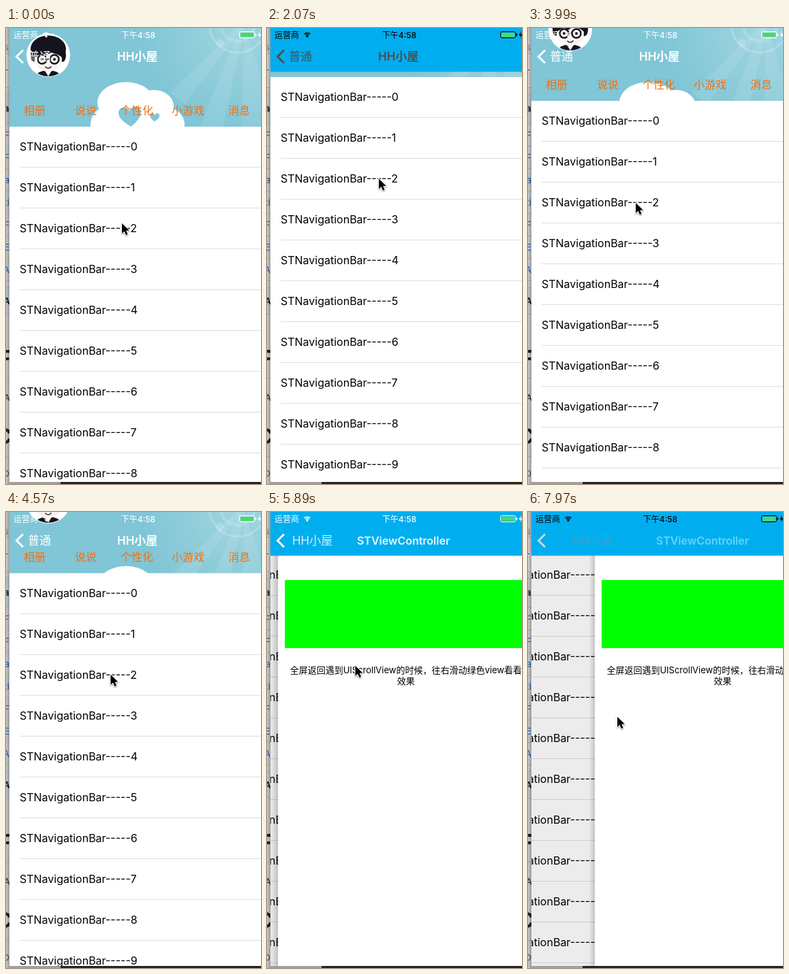
These frames come from a looping animation (374 by 670 pixels, 8000 ms). An HTML page with a canvas:

```html
<!DOCTYPE html>
<html lang="zh-CN">
<head>
<meta charset="utf-8">
<title>Navigation bar demo</title>
<style>
  html, body { margin: 0; width: 100%; height: 100%; overflow: hidden; background: #fff; }
  canvas { display: block; width: 374px; height: 670px; }
</style>
</head>
<body>
<canvas id="stage"></canvas>
<script>
const W = 374, H = 670, LOOP = 8000, TICK = 147.3;
const LEFT = 5, VIEW = 375, BOTTOM = 667, BAR = 64, MID = 192.5;
const FONT = 'Inter, "Noto Sans CJK SC", "Noto Sans CJK", sans-serif';
const BLUE = '#00aef0', SKY = '#80c6d6', INK = '#4c4f52';
const SPACE = 'HH小屋';

const canvas = document.getElementById('stage');
const dpr = window.devicePixelRatio || 1;
canvas.width = W * dpr;
canvas.height = H * dpr;
const c = canvas.getContext('2d');

// Keyframes are [tick, value]; the screen refreshes once per tick.
const SCROLL = [[0, 0], [8, 86], [20, 60], [23, 45], [24, 45], [27, 38], [28, 38], [35, 78], [36, 82]];
const PUSH = [[37, 0], [38, 0.3], [39, 0.85], [40, 0.97], [41, 1]];
const POINT_X = [[0, 170], [8, 165], [20, 163], [27, 158], [35, 149], [39, 149], [45, 32], [47, 20], [48, 20], [54, 131]];
const POINT_Y = [[0, 287], [8, 210], [20, 233], [23, 250], [24, 250], [27, 257], [28, 257], [35, 215], [36, 212],
  [39, 212], [45, 296], [48, 297], [54, 301]];

const mix = (a, b, k) => a + (b - a) * k;
const clamp = v => Math.max(0, Math.min(1, v));

function at(keys, t) {
  let prev = keys[0];
  for (const key of keys) {
    if (t < key[0]) return t <= prev[0] ? prev[1] : mix(prev[1], key[1], (t - prev[0]) / (key[0] - prev[0]));
    prev = key;
  }
  return prev[1];
}

function box(x, y, w, h, color) {
  c.fillStyle = color;
  c.fillRect(x, y, w, h);
}

function text(str, x, y, size, color, weight = 400, align = 'left', alpha = 1) {
  if (alpha <= 0) return;
  c.save();
  c.globalAlpha *= alpha;
  c.font = `${weight} ${size}px ${FONT}`;
  c.textAlign = align;
  c.fillStyle = color;
  c.fillText(str, x, y);
  c.restore();
}

function oval(x, y, rx, ry, color) {
  c.fillStyle = color;
  c.beginPath();
  c.ellipse(x, y, rx, ry, 0, 0, 7);
  c.fill();
}

function ring(x, y, r, width, color, from = 0, to = 2 * Math.PI) {
  c.strokeStyle = color;
  c.lineWidth = width;
  c.beginPath();
  c.arc(x, y, r, from, to);
  c.stroke();
}

function poly(points, color) {
  c.fillStyle = color;
  c.beginPath();
  points.forEach(([x, y]) => c.lineTo(x, y));
  c.closePath();
  c.fill();
}

function clip(x, y, w, h, draw) {
  c.save();
  c.beginPath();
  c.rect(x, y, w, h);
  c.clip();
  draw();
  c.restore();
}

// The web page that shows behind the phone's left edge
function backdrop() {
  box(0, 0, W, H, '#c9c9c9');
  box(0, 38, 5, 49, '#d2d0d0');
  box(0, 97, 5, 43, '#c0c6ca');
  box(0, 382, 5, 38, '#c0c6ca');
  for (const y of [37, 87, 97, 140, 173, 206, 239, 272, 305, 338, 371, 381, 420, 514, 629]) box(0, y, 5, 1, '#adadad');
  text('s', -3, 33, 13, '#777');
  text('-', -3, 66, 13, '#333');
  text('a', -3, 123, 13, '#222', 700);
  ['F', 'F', 'a', 'ti', 'F', 'CE', 'A'].forEach((s, i) =>
    text(s, 5, 162 + i * 33, 13, '#2459a8', 400, 'right'));
  text('A', 6, 406, 13, '#222', 700, 'right');
  text('F', 7, 498, 34, '#222', 700, 'right');
  text('A', 6, 548, 13, '#222', 400, 'right');
  text('C', 9, 611, 31, '#222', 700, 'right');
  text('O', 5, 659, 12, '#444', 400, 'right');
  const shade = c.createLinearGradient(0, 0, 5, 0);
  shade.addColorStop(0, 'rgba(0,0,0,0)');
  shade.addColorStop(1, 'rgba(0,0,0,.24)');
  box(0, 0, 5, H, shade);
  box(5, BOTTOM, 75, 3, '#a0a0a0');
  box(80, BOTTOM, W - 80, 3, '#232326');
}

function heart(x, y, s, tilt) {
  c.save();
  c.translate(x, y);
  c.rotate(tilt);
  c.scale(s, s);
  c.fillStyle = SKY;
  c.beginPath();
  c.moveTo(0, 0.9);
  c.bezierCurveTo(-0.5, 0.55, -1, 0.15, -1, -0.35);
  c.bezierCurveTo(-1, -0.95, -0.2, -1.05, 0, -0.45);
  c.bezierCurveTo(0.2, -1.05, 1, -0.95, 1, -0.35);
  c.bezierCurveTo(1, 0.15, 0.5, 0.55, 0, 0.9);
  c.fill();
  c.restore();
}

function sky() {
  box(LEFT, 0, VIEW, 145, SKY);
  const glow = c.createRadialGradient(345, 0, 5, 345, 0, 150);
  glow.addColorStop(0, 'rgba(255,255,255,.25)');
  glow.addColorStop(1, 'rgba(255,255,255,0)');
  box(180, 0, 200, 145, glow);
  const ray = 'rgba(255,255,255,.09)';
  poly([[338, 0], [240, 95], [262, 112], [346, 0]], ray);
  poly([[342, 0], [285, 145], [318, 145], [350, 0]], ray);
  poly([[350, 0], [345, 145], [374, 145], [374, 70]], ray);
  ring(340, -6, 42, 3, 'rgba(255,255,255,.2)');
  ring(340, -6, 25, 5, 'rgba(255,255,255,.14)');
  oval(314, 22, 6, 6, 'rgba(255,255,255,.2)');
  oval(176, 109.5, 42, 30, '#fff');
  oval(217, 115, 29, 24, '#fff');
  oval(148, 142, 24, 26, '#fff');
  oval(236, 142, 26, 25, '#fff');
  box(140, 112, 98, 33, '#fff');
  heart(182, 130, 16.5, -0.08);
  heart(218, 131, 7, 0.05);
}

function avatar(y) {
  c.save();
  c.translate(62, y);
  oval(0, 0, 32, 32, '#fff');
  c.beginPath();
  c.arc(0, 0, 31, 0, 7);
  c.clip();
  const ink = '#14141f';
  oval(0, 31, 18, 9, ink);
  poly([[-6, 21], [0, 31], [6, 21]], '#fff');
  oval(0, -9, 26, 20, ink);
  oval(-21, 0, 5, 10, ink);
  oval(21, 0, 5, 10, ink);
  oval(0, 6, 20, 18, '#f8f3f0');
  poly([[-22, -6], [-19, 3], [-9, -3], [-3, 1], [4, -4], [14, -1], [20, 3], [23, -6], [12, -15], [-12, -15]], ink);
  for (const side of [-1, 1]) {
    ring(side * 9, 6, 6.5, 2.4, ink);
    oval(side * 9, 6, 2, 2, ink);
  }
  box(-3, 5, 6, 2, ink);
  ring(0, 14, 5, 1.4, ink, 0.5, 2.6);
  c.restore();
}

function list(offset) {
  const top = 145 - offset;
  sky();
  avatar(40 - offset);
  ['相册', '说说', '个性化', '小游戏', '消息'].forEach((s, i) =>
    text(s, 42 + 75 * i, 127 - offset, 16, '#f07010', 400, 'center'));
  box(LEFT, top, VIEW, BOTTOM - top, '#fff');
  for (let i = 0; top + i * 60 < BOTTOM; i++) {
    const y = top + i * 60;
    text('STNavigationBar-----' + i, 20, y + 35, 16, '#000');
    box(20, y + 59, VIEW - 15, 1, '#dddde0');
  }
}

function detail() {
  const edge = c.createLinearGradient(LEFT - 9, 0, LEFT, 0);
  edge.addColorStop(0, 'rgba(0,0,0,0)');
  edge.addColorStop(1, 'rgba(0,0,0,.17)');
  box(LEFT - 9, BAR, 9, BOTTOM - BAR, edge);
  box(LEFT, BAR, VIEW, BOTTOM - BAR, '#fff');
  box(15, 100, 355, 100, '#0f0');
  text('全屏返回遇到UIScrollView的时候，往右滑动绿色view看看', MID, 237, 13, '#000', 400, 'center');
  text('效果', MID, 253, 13, '#000', 400, 'center');
}

function status(color) {
  text('运营商', 11, 14.5, 12, color);
  for (const r of [3.5, 6.3]) ring(59, 13.5, r, 1.5, color, -2.35, -0.79);
  oval(59, 12.6, 1.5, 1.5, color);
  text('下午4:58', 194, 14.5, 12, color, 500, 'center');
  c.strokeStyle = color;
  c.lineWidth = 1;
  c.beginPath();
  c.roundRect(342.5, 5.5, 22, 9, 2);
  c.stroke();
  box(344, 7, 19, 6, '#4cd964');
  box(365.5, 8, 1.5, 4, color);
  poly([[373, 5], [369, 11], [372, 11], [371, 15], [375, 9], [372, 9]], color);
}

function chevron(color) {
  c.strokeStyle = color;
  c.lineWidth = 3;
  c.beginPath();
  c.moveTo(25, 32.5);
  c.lineTo(15.5, 42);
  c.lineTo(25, 51.5);
  c.stroke();
}

// p: 0 shows the list's bar, 1 shows the detail page's bar
function bar(p, solid, light) {
  const q = 1 - p;
  const tint = solid ? INK : '#fff';
  if (solid) {
    box(LEFT, 0, VIEW, BAR, BLUE);
    box(LEFT, BAR, VIEW, 0.5, 'rgba(0,0,0,.25)');
  }
  status(light ? '#fff' : '#000');
  const g = Math.round(mix(solid ? 78 : 255, 255, p));
  chevron(`rgb(${g},${g},${g})`);
  text('普通', 32 - 40 * p, 48.3, 17, tint, 400, 'left', 1 - 2 * p);
  const x = mix(163, 33, p);
  text(SPACE, x, 48.3, 17, tint, p ? 400 : 600, 'left', q ** 0.8);
  text(SPACE, x, 48.3, 17, '#fff', 400, 'left', p ** 6);
  text('STViewController', MID + q * 256, 48, 16, '#fff', 600, 'center', p ** 3);
}

function pointer(x, y) {
  c.save();
  c.translate(x, y);
  c.shadowColor = 'rgba(0,0,0,.35)';
  c.shadowBlur = 2 * dpr;
  c.shadowOffsetY = dpr;
  const shape = [[0, 0], [0, 15], [3.5, 11.8], [6, 17.2], [8.6, 16], [6.2, 10.8], [10.8, 10.6]];
  c.lineWidth = 2;
  c.lineJoin = 'round';
  c.strokeStyle = '#fff';
  poly(shape, '#000');
  c.stroke();
  c.shadowColor = 'transparent';
  poly(shape, '#000');
  c.restore();
}

function draw(ms) {
  const t = Math.floor((ms + 10) / TICK);
  const offset = at(SCROLL, t), x = at(POINT_X, t), y = at(POINT_Y, t);
  const drag = t > 48 ? Math.max(0, x - 38) / VIEW : 0;
  const p = clamp(at(PUSH, t) - drag);
  const solid = offset > 64;
  const light = !solid || (p > 0 && t <= 48);

  c.setTransform(dpr, 0, 0, dpr, 0, 0);
  backdrop();
  clip(LEFT, 0, W - LEFT, BOTTOM, () => {
    if (p < 1) {
      c.save();
      c.translate(-112 * p, 0);
      list(offset);
      c.restore();
    }
    if (p > 0) {
      box(LEFT, BAR, VIEW, BOTTOM - BAR, `rgba(0,0,0,${0.1 * p})`);
      c.save();
      c.translate(VIEW * (1 - p), 0);
      detail();
      c.restore();
    }
    bar(p, solid, light);
  });
  pointer(x, y);
}

const start = performance.now();
function loop() {
  draw((performance.now() - start) % LOOP);
  requestAnimationFrame(loop);
}
loop();
</script>
</body>
</html>
```
